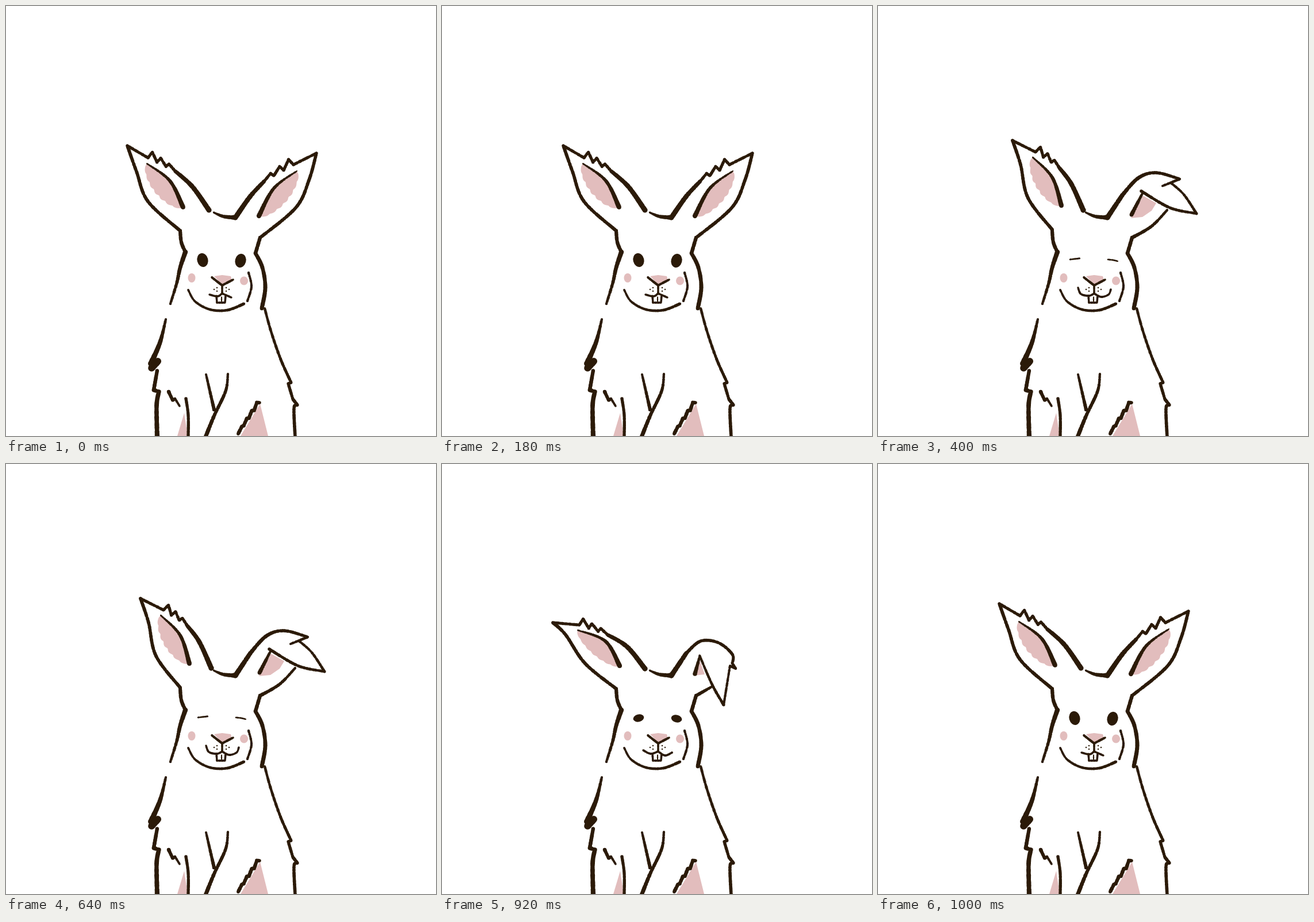
An HTML page with a canvas that plays this animation: 748x748 px, repeating every 1100 ms.

```html
<!DOCTYPE html>
<html lang="en">
<head>
<meta charset="utf-8">
<title>Rabbit</title>
<style>
html, body { margin: 0; width: 100%; height: 100%; overflow: hidden; background: #fff; }
canvas { display: block; width: 748px; height: 748px; }
</style>
</head>
<body>
<canvas id="stage" width="748" height="748"></canvas>
<script>
const ctx = document.getElementById('stage').getContext('2d');
const INK = '#2b1a08', PINK = '#e2bdbd';

let seed;
const random = () => (seed = seed * 16807 % 2147483647) / 2147483647;
const lerp = (a, b, t) => a + (b - a) * t;
const mix = (a, b, t) => [lerp(a[0], b[0], t), lerp(a[1], b[1], t)];
const parse = text => text.trim().split(/\s+/).map(p => p.split(',').map(Number));

// Catmull-Rom curve through the points
function smooth(pts) {
  const out = [pts[0]], steps = 12;
  for (let i = 0; i + 1 < pts.length; i++) {
    const b = pts[i], c = pts[i + 1], a = pts[i - 1] || b, d = pts[i + 2] || c;
    for (let n = 1; n <= steps; n++) {
      const t = n / steps;
      out.push([0, 1].map(k => b[k] + t / 2 * (c[k] - a[k] + t * (2 * a[k] - 5 * b[k] + 4 * c[k] - d[k]
        + t * (3 * (b[k] - c[k]) + d[k] - a[k])))));
    }
  }
  return out;
}

// Slightly rough brush line whose width runs from w0 to w1
function brush(pts, w0, w1 = w0) {
  ctx.fillStyle = INK;
  ctx.beginPath();
  for (let i = 0; i + 1 < pts.length; i++) {
    const [a, b] = [pts[i], pts[i + 1]];
    const steps = Math.ceil(Math.hypot(b[0] - a[0], b[1] - a[1]));
    for (let n = 0; n <= steps; n++) {
      const [x, y] = mix(a, b, n / steps);
      const r = lerp(w0, w1, (i + n / steps) / (pts.length - 1)) / 2 + random() * 0.6 - 0.3;
      ctx.moveTo(x + r, y);
      ctx.arc(x, y, r, 0, 7);
    }
  }
  ctx.fill();
}

// A slash in the text marks a sharp corner at the point before it
function ink(text, w0, w1) {
  let corner = [];
  const line = text.split('/').flatMap(part => {
    const curve = smooth([...corner, ...parse(part)]);
    corner = curve.slice(-1);
    return curve;
  });
  brush(line, w0, w1);
}

// Jagged hair from a to b, each tooth lower than the one before
function fur(a, b, teeth, height, width) {
  const dx = b[0] - a[0], dy = b[1] - a[1], length = Math.hypot(dx, dy), line = [a];
  for (let i = 0; i < teeth; i++) {
    const [x, y] = mix(a, b, (i + 0.15) / teeth);
    const h = height * (1 - 0.7 * i / teeth) / length;
    line.push([x + dy * h, y - dx * h], mix(a, b, (i + 1) / teeth));
  }
  brush(line, width);
}

function polygon(pts) {
  ctx.fillStyle = PINK;
  ctx.beginPath();
  pts.forEach(p => ctx.lineTo(...p));
  ctx.fill();
}

// Pink hollow between a fold and a scalloped arc
function hollow(fold, bulge) {
  const a = fold[0], b = fold[fold.length - 1], length = Math.hypot(b[0] - a[0], b[1] - a[1]);
  const edge = [];
  for (let t = 0; t <= 1; t += 0.02) {
    const [x, y] = mix(b, a, t);
    const swell = Math.sqrt(Math.sin(Math.PI * t)) * bulge * (1 + 0.15 * Math.abs(Math.sin(7 * Math.PI * t)));
    edge.push([x - (b[1] - a[1]) * swell / length, y + (b[0] - a[0]) * swell / length]);
  }
  polygon([...fold, ...edge]);
}

// rim and edge run from the tip and the hair down to the head; side is 1 left, -1 right
function ear(side, rim, tuft, edge, fold, bulge) {
  const [tip] = parse(rim), [start] = parse(tuft), [end] = parse(edge);
  const crease = smooth(parse(fold));
  hollow(crease, bulge * side);
  brush(crease, 2.5, 8);
  brush([tip, start], 5);
  fur(start, end, 3, 12 * side, 5);
  ink(edge, 6, 9);
  ink(rim, 5.5);
}

function oval(x, y, rx, ry, turn = 0, color = INK) {
  ctx.fillStyle = color;
  ctx.beginPath();
  ctx.ellipse(x, y, rx, ry, turn, 0, 7);
  ctx.fill();
}

function eyes(rx, ry) {
  oval(342, 442, rx, ry, -0.25);
  oval(408, 443, rx, ry, 0.25);
}

function body() {
  ink('361,359 378,366 399,368', 3, 8);
  ink('303,391 305,411 312,428', 6);
  ink('312,428 303,455 297,482 286,518', 8, 4);
  ink('442,403 434,430 / 446,455 451,490 445,526', 6, 7);

  ink('278,545 268,585 252,622', 4, 10);
  ink('264,618 253,630', 12);
  ink('263,634 257,668 / 266,671 / 262,695 263,750', 6, 8);
  ink('450,526 461,566 478,615 496,655 / 491,657 / 499,684 / 507,694 / 501,700 503,750', 4.5, 5.5);

  polygon(parse('310,708 298,748 316,748'));
  polygon(parse('442,692 456,748 408,748'));
  ink('348,641 356,676 362,702', 4, 6);
  ink('386,640 382,670 362,713 347,750', 4, 7);
  ink('283,671 290,686 / 294,683 / 302,696', 6, 3.5);
  ink('313,683 317,712 317,750', 5);
  fur([441, 690], [404, 744], 4, -4, 6);
}

function face() {
  oval(323, 473, 6.5, 8, 0, PINK);
  oval(414, 478, 7, 7.5, 0, PINK);
  ink('317,494 329,514 355,528 385,529 414,518', 3.5, 5);
  ink('422,464 427,488 420,513', 4);
  polygon(parse('362,470 376,468 391,470 393,477 376,485'));
  ink('358,472 376,486 / 395,476', 4);
  ink('376,486 376,501', 3.5);
  ink('366,504 367,516 / 381,516 / 382,504', 3.5);
  ink('375,506 375,514', 2);
  for (const side of [-1, 1])
    for (const [x, y] of [[8, 490], [13, 493], [8, 496]]) oval(375 + side * x, y, 1.2, 1.2);
}

function upright() {
  ear(1, '211,243 227,288 247,340 303,391', '247,264', '294,287 324,314 353,355',
    '245,274 285,304 308,350', 19);
  ear(-1, '540,256 527,303 504,351 442,403', '500,276', '449,305 425,331 399,368',
    '506,287 466,317 440,365', 18);
  eyes(9.5, 12);
  ink('354,502 368,505 376,500 / 392,507', 3.5);
}

function drooped() {
  ear(1, '193,276 215,297 249,347 303,391', '239,280', '288,297 322,318 353,356',
    '236,289 284,308 309,351', 13);
  polygon(parse('449,343 457,366 438,368'));
  ink('399,368 425,329', 9, 7);
  ink('425,329 450,308 481,311 505,331 505,347 / 511,356 / 501,351 / 490,419', 5.5, 4);
  ink('490,419 470,384 448,333', 5, 4);
  ink('448,336 440,365', 4, 7);
  ink('470,387 442,403', 4, 6);
  eyes(9.5, 6.5);
  ink('350,498 363,504 376,500 / 388,507 400,502', 3.5);
}

function smiling() {
  ear(1, '234,234 248,276 261,334 303,389', '274,254', '315,281 336,309 357,355',
    '269,263 303,298 319,347', 19);
  polygon(parse('461,330 484,343 476,356 460,367 440,369'));
  ink('399,368 425,329', 9, 7);
  ink('425,329 453,299 484,290 525,301 / 495,313', 6.5, 4);
  ink('510,308 532,328 554,361 / 508,351 458,322', 4, 5);
  ink('460,326 441,363', 4, 7);
  ink('503,355 476,383 442,403', 4, 6);
  ink('334,441 342,440 351,439', 2.5);
  ink('400,441 409,442 417,444', 2.5);
  ink('348,490 353,501 367,504 376,500 / 388,506 401,502 405,493', 3.5);
}

const poseAt = t => t < 300 || t >= 1000 ? upright : t >= 400 && t < 800 ? smiling : drooped;
let shown;

function frame() {
  const pose = poseAt(performance.now() % 1100);
  if (pose !== shown) {
    shown = pose;
    seed = 7;
    ctx.clearRect(0, 0, 748, 748);
    body();
    face();
    pose();
  }
  requestAnimationFrame(frame);
}
frame();
</script>
</body>
</html>
```
